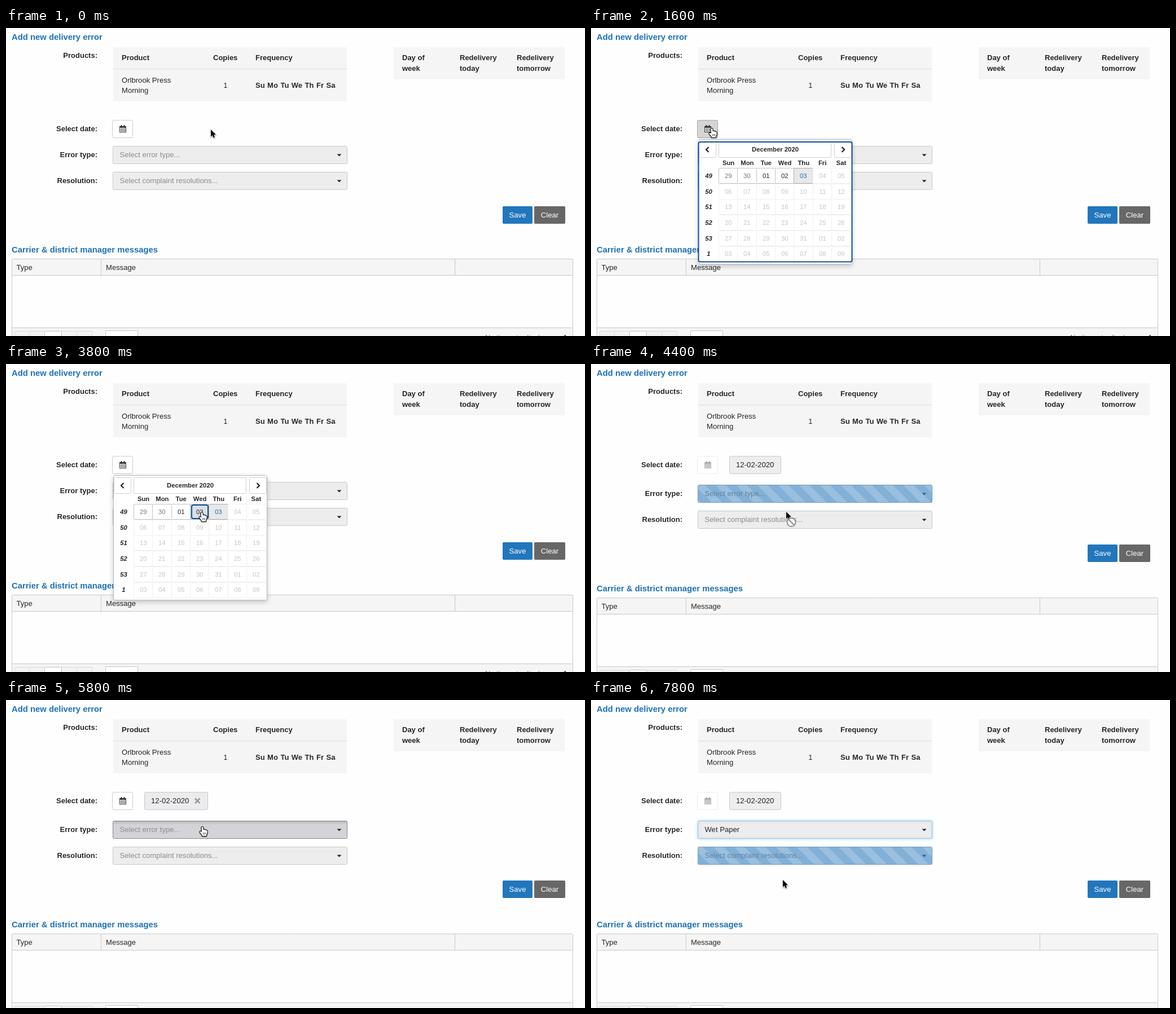
Write an HTML page with a canvas that moves like this. It is 1026 px wide and 546 px high and loops after 8000 ms.

```html
<!DOCTYPE html>
<html lang="en">
<head>
<meta charset="utf-8">
<title>Delivery error form</title>
<style>
  html, body { margin: 0; width: 100%; height: 100%; overflow: hidden; background: #fefefe; }
  canvas { display: block; }
</style>
</head>
<body>
<canvas id="stage" width="1026" height="546"></canvas>
<script>
const ctx = document.getElementById('stage').getContext('2d');
const FONT = '"Liberation Sans", Arial, sans-serif';
const LOOP = 8000, STEP = 200;
const PICK = 4000, LOADED = 5000, OPEN = 6000, CHOOSE = 7200;
const BLUE = '#1f72b4', INK = '#262626', RING = '#10509a';

const DAYS = ['Sun', 'Mon', 'Tue', 'Wed', 'Thu', 'Fri', 'Sat'];
const WEEKS = [49, 50, 51, 52, 53, 1];
const ERRORS = ['Damaged Paper', 'Late Delivery', 'Missed Delivery',
  'Not Delivered to the Requested Location', 'Poor Service', 'Property Damaged',
  'Repeat call to redeliver', 'Repeat call to start', 'Repeat call to stop', 'Wet Paper'];

// Pointer stops: time, x, y
const PATH = [
  [0, 363, 180], [400, 363, 180], [1000, 214, 178], [1800, 214, 178],
  [2800, 347, 263], [3800, 347, 263], [4000, 346, 262], [4800, 346, 262],
  [5400, 348, 225], [6000, 348, 225], [6600, 321, 392], [7000, 318, 409],
  [7200, 318, 409], [7800, 340, 319], [8000, 340, 319]
];

function pointerAt(t) {
  let i = 1;
  while (PATH[i][0] < t) i++;
  const [t0, x0, y0] = PATH[i - 1], [t1, x1, y1] = PATH[i];
  const u = (t - t0) / (t1 - t0), e = u * u * (3 - 2 * u);
  return { x: x0 + (x1 - x0) * e, y: y0 + (y1 - y0) * e };
}

const inside = (p, x, y, w, h) => p.x >= x && p.x < x + w && p.y >= y && p.y < y + h;

function text(str, x, y, { size = 13.1, bold, italic, color = INK, align = 'left', gap = 0 } = {}) {
  ctx.font = `${italic ? 'italic ' : ''}${bold ? 'bold ' : ''}${size}px ${FONT}`;
  ctx.wordSpacing = gap + 'px';
  ctx.fillStyle = color;
  ctx.textAlign = align;
  ctx.fillText(str, x, Math.round(y + size * 0.34));
}

const heading = (str, y) => text(str, 10, y, { size: 14.85, bold: true, color: BLUE });
const bold = (str, x, y, align, gap) => text(str, x, y, { size: 13, bold: true, align, gap });

function rect(x, y, w, h, fill) {
  ctx.fillStyle = fill;
  ctx.fillRect(x, Math.round(y), w, h);
}

function box(x, y, w, h, fill, border, radius = 2, line = 1) {
  ctx.beginPath();
  ctx.roundRect(x + line / 2, Math.round(y) + line / 2, w - line, h - line, radius);
  if (fill) { ctx.fillStyle = fill; ctx.fill(); }
  if (border) { ctx.strokeStyle = border; ctx.lineWidth = line; ctx.stroke(); }
}

function shadowed(color, blur, dy, draw) {
  ctx.save();
  ctx.shadowColor = color;
  ctx.shadowBlur = blur;
  ctx.shadowOffsetY = dy;
  draw();
  ctx.restore();
}

function polygon(points, fill, stroke, width = 1) {
  ctx.beginPath();
  points.forEach(([x, y]) => ctx.lineTo(x, y));
  ctx.closePath();
  if (stroke) { ctx.strokeStyle = stroke; ctx.lineWidth = width; ctx.stroke(); }
  if (fill) { ctx.fillStyle = fill; ctx.fill(); }
}

function products() {
  heading('Add new delivery error', 16);
  bold('Products:', 162, 49, 'right');
  rect(190, 34, 414, 96, '#f5f5f5');
  rect(190, 72, 414, 1, '#dedede');
  bold('Product', 205, 53);
  bold('Copies', 367, 53);
  bold('Frequency', 442, 53);
  text('Orlbrook Press', 205, 92.5);
  text('Morning', 205, 111);
  text('1', 389, 102, { align: 'center' });
  bold('Su Mo Tu We Th Fr Sa', 442, 102, 'left', 0.9);

  rect(687, 34, 303, 57, '#f5f5f5');
  [['Day of', 'week', 702], ['Redelivery', 'today', 804], ['Redelivery', 'tomorrow', 905]]
    .forEach(([a, b, x]) => { bold(a, x, 53); bold(b, x, 71.5); });
}

function calendarIcon(x, y) {
  rect(x, y + 2, 12, 11, '#333');
  rect(x + 2.5, y, 2, 4, '#333');
  rect(x + 7.5, y, 2, 4, '#333');
  ctx.fillStyle = '#fff';
  for (let r = 0; r < 3; r++)
    for (let c = 0; c < 4; c++) ctx.fillRect(x + 0.9 + c * 2.65, y + 4.8 + r * 2.6, 2.1, 2);
}

function dateRow(s) {
  bold('Select date:', 162, 179, 'right');
  ctx.globalAlpha = s.loading ? 0.35 : 1;
  box(188, 163, 37, 32, s.dateHot ? '#d5d5d5' : '#fff', s.dateHot ? '#a8a8a8' : '#ccc');
  calendarIcon(201, 172);
  ctx.globalAlpha = 1;
  if (!s.dated) return;
  box(245, 163, s.loading ? 92 : 113, 32, s.loading ? '#eee' : '#ececef', '#c8c8c8');
  text('12-02-2020', 257, 179, { size: 13.2 });
  if (s.loading) return;
  ctx.strokeStyle = '#999';
  ctx.lineWidth = 2.6;
  ctx.beginPath();
  ctx.moveTo(335, 174.5); ctx.lineTo(343.5, 183);
  ctx.moveTo(343.5, 174.5); ctx.lineTo(335, 183);
  ctx.stroke();
}

// Diagonal bands sliding left one period every two seconds
function stripes(y, age) {
  const period = 37, shift = (age / 2000 * period) % period;
  ctx.save();
  ctx.beginPath();
  ctx.rect(190, y + 1, 414, 30);
  ctx.clip();
  for (let x = 190 - 2 * period - shift; x < 604; x += period)
    polygon([[x, y], [x + period / 2, y], [x + period / 2 + 32, y + 32], [x + 32, y + 32]], '#9abfdf');
  ctx.restore();
}

function select(top, label, mode, age) {
  const y = Math.round(top);
  const look = {
    idle: ['#ededed', '#c8c8c8'], hover: ['#e1e1e3', '#aaa'], press: ['#d4d4d8', '#888'],
    load: ['#82b0d7', '#7699b7'], open: ['#fff', '#5aa9d6'], chosen: ['#ededed', '#9fc4e0']
  }[mode];
  const draw = () => box(189, y, 416, 32, ...look);
  if (mode === 'open' || mode === 'chosen') shadowed('rgba(90,175,235,.5)', 5, 0, draw);
  else draw();
  if (mode === 'press') {
    const g = ctx.createLinearGradient(0, y, 0, y + 7);
    g.addColorStop(0, 'rgba(0,0,0,.16)');
    g.addColorStop(1, 'rgba(0,0,0,0)');
    rect(190, y + 1, 414, 7, g);
  }
  if (mode === 'load') stripes(y, age);
  const color = mode === 'chosen' ? INK : mode === 'load' ? '#61819d' : '#8c8c8c';
  text(label, 201.5, top + 16, { color });
  if (mode !== 'open')
    polygon([[586.5, y + 14.5], [594.5, y + 14.5], [590.5, y + 18.5]], mode === 'load' ? '#315f86' : '#222');
}

function button(x, y, w, label, fill) {
  box(x, y, w, 31, fill, fill, 1);
  text(label, x + w / 2, y + 15.5, { color: '#fff', align: 'center' });
}

function messages(dy) {
  heading('Carrier & district manager messages', 393 + dy);
  box(10, 409 + dy, 995, 200, '#fefefe', '#c9c9c9', 1);
  rect(11, 410 + dy, 993, 28, '#f5f5f5');
  rect(11, 438 + dy, 993, 1, '#c9c9c9');
  rect(168, 410 + dy, 1, 28, '#c9c9c9');
  rect(795, 410 + dy, 1, 28, '#c9c9c9');
  text('Type', 18.5, 425 + dy);
  text('Message', 177, 425 + dy);
  rect(11, 531 + dy, 993, 1, '#c9c9c9');
  rect(11, 532 + dy, 993, 30, '#f5f5f5');
  [15, 41, 98, 125].forEach(x => box(x, 537 + dy, 28, 28, '#f3f3f3', '#dcdcdc', 1));
  box(68, 537 + dy, 31, 28, '#fff', '#c4c4c4', 1);
  box(176, 536 + dy, 58, 28, '#fff', '#c4c4c4', 1);
  text('No items to display', 849, 548.5 + dy, { color: '#888' });
  polygon([[988, 546 + dy], [992, 543.5 + dy], [992, 549 + dy]], '#444');
}

const cellX = c => 227 + c * 33.3;
const cellY = r => 248 + r * 27.7;

function chevron(x, dir) {
  ctx.beginPath();
  ctx.moveTo(x - 2.5 * dir, 211);
  ctx.lineTo(x + 2 * dir, 215.5);
  ctx.lineTo(x - 2.5 * dir, 220);
  ctx.strokeStyle = '#222';
  ctx.lineWidth = 2.2;
  ctx.stroke();
}

function calendar(s) {
  shadowed('rgba(0,0,0,.2)', 8, 3, () => box(190, 197, 273, 222, '#fff', '#bdbdbd', 3));
  box(191, 201, 31, 29, '#fff', '#d0d0d0');
  box(226, 201, 200, 29, '#fff', '#d0d0d0');
  box(431, 201, 31, 29, '#fff', '#d0d0d0');
  chevron(206, -1);
  chevron(447, 1);
  text('December 2020', 326.5, 215.5, { size: 11.3, bold: true, align: 'center' });
  DAYS.forEach((d, c) => text(d, cellX(c) + 16.6, 239.5, { size: 11.3, bold: true, align: 'center' }));

  WEEKS.forEach((week, r) => {
    const mid = cellY(r) + 14;
    text(week, 208.5, mid, { size: 11.3, bold: true, italic: true, align: 'center' });
    for (let c = 0; c < 7; c++) {
      const n = r * 7 + c - 1, live = n <= 3;
      const day = n < 1 ? n + 30 : n > 31 ? n - 31 : n;
      const x = Math.round(cellX(c)), y = Math.round(cellY(r));
      const today = n === 3, hot = live && inside(s.p, x, y, 33, 28);
      const fill = hot ? '#dedede' : today ? '#e8e8e8' : '#fff';
      box(x - 1, y, 35, 28, fill, live ? (today ? '#a9a9a9' : '#c2c2c2') : '#efefef', 1);
      if (n === 2 && s.picked) box(x + 1, y + 1, 31, 26, '#d9dfe8', RING, 3, 2);
      const color = today ? BLUE : !live ? '#c6c6c6' : n < 1 ? '#777' : INK;
      text(String(day).padStart(2, '0'), x + 16.3, mid, { size: 11.3, color, align: 'center' });
    }
  });
  if (!s.picked) box(189.5, 201, 274, 214.5, null, RING, 3, 2);
}

function dropdown(s) {
  const top = 245, h = 184;
  shadowed('rgba(0,0,0,.2)', 8, 3, () => box(190, top, 414, h, '#fff', '#cfcfcf', 2));
  ctx.save();
  ctx.beginPath();
  ctx.rect(191, top + 1, 412, h - 2);
  ctx.clip();
  ERRORS.forEach((name, i) => {
    const y = top + 5 + i * 24 - s.scroll;
    if (s.p.y > top && inside({ x: s.p.x, y: s.p.y + 3 }, 190, y, 414, 24)) rect(191, y, 412, 24, '#f4f4f4');
    text(name, 209, y + 12.5, { color: name === 'Missed Delivery' ? '#1c4b70' : INK });
  });
  ctx.restore();
}

function arrow({ x, y }) {
  shadowed('rgba(0,0,0,.35)', 2, 1, () => polygon(
    [[0, 0], [0, 12.4], [2.8, 9.8], [4.8, 14.2], [6.9, 13.2], [5, 8.9], [8.9, 8.9]]
      .map(([a, b]) => [x + a, y + b]), '#000', '#fff', 2));
}

function blocked({ x, y }) {
  arrow({ x, y });
  ctx.beginPath();
  ctx.arc(x + 9, y + 18.5, 7.5, 0, 7);
  ctx.fillStyle = 'rgba(245,245,245,.9)';
  ctx.fill();
  ctx.strokeStyle = '#8c8c8c';
  ctx.lineWidth = 1.8;
  ctx.moveTo(x + 4, y + 13.5);
  ctx.lineTo(x + 14, y + 23.5);
  ctx.stroke();
}

function hand({ x, y }) {
  ctx.save();
  ctx.translate(x, y);
  ctx.lineJoin = 'round';
  shadowed('rgba(0,0,0,.3)', 2, 1, () => polygon(
    [[-1.6, 1], [-.6, 0], [.7, 0], [1.5, 1.2], [1.7, 5.2], [3, 4.5], [4.2, 5.6], [5.6, 5],
     [6.6, 6.2], [7.9, 6.1], [8.7, 7.3], [8.5, 11], [7.2, 13.5], [7.2, 16], [-.2, 16],
     [-.6, 14], [-4.4, 9.4], [-4.2, 8], [-2.8, 7.8], [-1, 9.4]], '#fff', '#000', 2));
  ctx.strokeStyle = '#333';
  ctx.lineWidth = 0.8;
  ctx.beginPath();
  [1.5, 3.5, 5.5].forEach(a => { ctx.moveTo(a, 10); ctx.lineTo(a, 13.5); });
  ctx.stroke();
  ctx.restore();
}

function pointer(s) {
  const { p, t } = s;
  const onDay = s.calendar && inside(p, 227, 248, 166, 28);
  const onField = t >= 5200 && t < CHOOSE;
  if (s.dateHot || onDay || onField) hand(p);
  else if (s.loading && inside(p, 189, 214, 416, 78)) blocked(p);
  else arrow(p);
}

function stateAt(t) {
  const p = pointerAt(t);
  const first = t >= PICK && t < LOADED, second = t >= CHOOSE;
  return {
    t, p, first, second,
    loading: first || second,
    dated: t >= PICK,
    dateHot: t < PICK && inside(p, 188, 163, 37, 32),
    calendar: t >= 1400 && t < PICK,
    picked: t >= 3800,
    list: t >= OPEN && t < CHOOSE,
    scroll: 67 * Math.min(1, Math.max(0, (t - OPEN) / 600))
  };
}

function errorMode(s) {
  if (s.first) return 'load';
  if (s.second) return 'chosen';
  if (s.list) return 'open';
  if (s.t >= 5800) return 'press';
  return s.t >= 5200 ? 'hover' : 'idle';
}

function draw(t) {
  const s = stateAt(t), dy = s.dated ? 4.6 : 0;
  rect(0, 0, 1026, 546, '#fefefe');
  products();
  dateRow(s);
  bold('Error type:', 162, 225 + dy, 'right');
  bold('Resolution:', 162, 271 + dy, 'right');
  select(255 + dy, 'Select complaint resolutions...', s.second ? 'load' : 'idle', t - CHOOSE);
  select(209 + dy, s.second ? 'Wet Paper' : 'Select error type...', errorMode(s), t - PICK);
  button(880, 315.7 + dy, 53, 'Save', '#2276bc');
  button(936, 315.7 + dy, 55, 'Clear', '#676767');
  messages(dy);
  if (s.calendar) calendar(s);
  if (s.list) dropdown(s);
  pointer(s);
}

const start = performance.now();
function tick() {
  const t = (performance.now() - start) % LOOP;
  draw(Math.floor(t / STEP) * STEP);
  requestAnimationFrame(tick);
}
tick();
</script>
</body>
</html>
```
